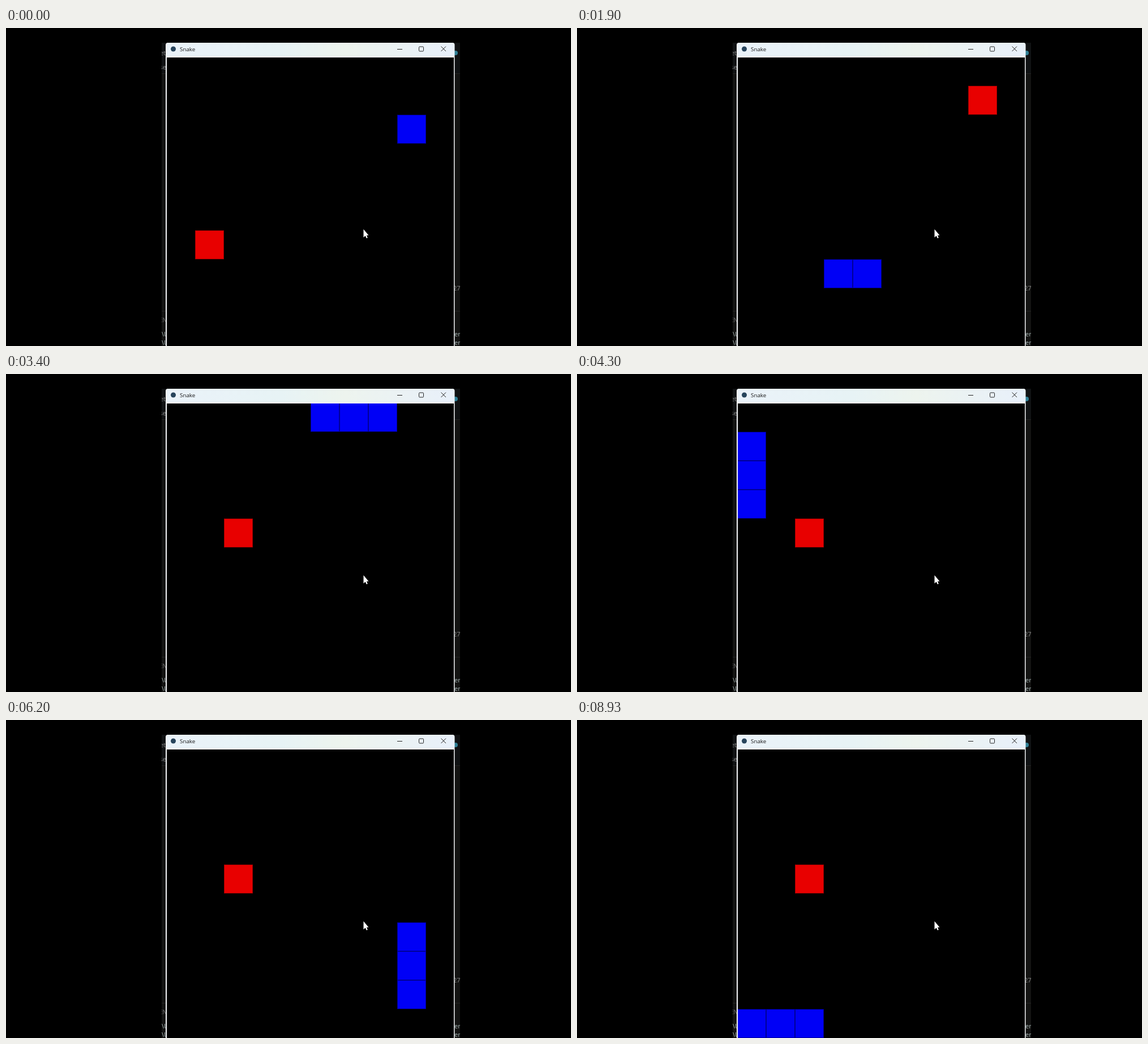
An HTML page for the animation above (8.96 s loop, 998 by 561 pixels).

```html
<!DOCTYPE html>
<html lang="en">
<head>
<meta charset="utf-8">
<title>Snake</title>
<style>
  html, body { margin: 0; width: 100%; height: 100%; overflow: hidden; background: #000; }
  svg { display: block; width: 100vw; height: 100vh; }
  text { font-family: "Open Sans", "Noto Sans", sans-serif; }
  .editor text { font-size: 11px; fill: #8b8b8b; }
  .editor .path { fill: #a9b8b8; }
  .editor .tab { fill: #777; font-size: 10px; }
  .buttons { fill: none; stroke: #222; stroke-width: 1; }
</style>
</head>
<body>
<svg viewBox="0 0 998 561">
  <defs>
    <linearGradient id="bar">
      <stop offset="0" stop-color="#eaf2f9"/>
      <stop offset=".4" stop-color="#e7f3f5"/>
      <stop offset=".62" stop-color="#edf4ee"/>
      <stop offset="1" stop-color="#e8f0fa"/>
    </linearGradient>
    <clipPath id="desk"><rect x="275" y="26" width="527" height="535"/></clipPath>
    <clipPath id="field"><rect x="284" y="52" width="507" height="509"/></clipPath>
  </defs>
  <rect width="998" height="561"/>

  <g class="editor" clip-path="url(#desk)">
    <rect x="275" y="26" width="527" height="535" fill="#141413"/>
    <rect x="275" y="26" width="527" height="54" fill="#101214"/>
    <path d="M275 80.500H802M275 499.500H802" stroke="#252525"/>
    <text x="282" y="48" text-anchor="end">Set</text>
    <text x="283" y="73" text-anchor="end">use</text>
    <text class="tab" x="284" y="519" text-anchor="end">EN</text>
    <text class="path" x="275" y="544">\U</text>
    <text class="path" x="275" y="559">\U</text>
    <circle cx="794" cy="44" r="4" fill="#2f7f96"/>
    <text x="790" y="463">27</text>
    <text class="path" x="792" y="544">er</text>
    <text class="path" x="792" y="559">er</text>
  </g>

  <path d="M282 561V30q0-4 4-4H788.500q4 0 4 4V561z" fill="#f4f6f8"/>
  <path d="M283 50V30q0-4 4-4H788q4 0 4 4V50z" fill="url(#bar)"/>
  <rect x="284" y="52" width="507" height="509"/>
  <circle cx="295.500" cy="37" r="4.500" fill="#27445c"/>
  <text x="307" y="41" font-size="9.800" fill="#1a1a1a">Snake</text>
  <g class="buttons">
    <path d="M691 37.500H700M768.500 32.500L777 41M777 32.500L768.500 41"/>
    <rect x="729.500" y="33" width="8" height="8" rx="1.300"/>
  </g>

  <g id="board" clip-path="url(#field)"></g>
  <path d="M631.500 355V369.500L634.700 366.600L636.800 371L638.800 370L636.900 365.800H640.500z" fill="#fff"/>
</svg>

<script>
const LOOP = 8960, DELAY = 180, TICK = 110.5, CELL = 51;
const START = [8, 2];
const ROUTE = "L7 D5 R7 U7 L8 D9 R8 U9 L8 D9 R2";
const FOODS = [[1, 6], [8, 1], [2, 4]];
const EATEN = [12, 26];   // steps on which the snake grows and new food appears
const DIRS = { L: [-1, 0], R: [1, 0], U: [0, -1], D: [0, 1] };

const path = [START];
for (const leg of ROUTE.split(" ")) {
  const [dx, dy] = DIRS[leg[0]];
  for (let i = +leg[1]; i > 0; i--) {
    const [x, y] = path[path.length - 1];
    path.push([x + dx, y + dy]);
  }
}

const board = document.getElementById("board");

function makeTile(fill, edge) {
  const tile = document.createElementNS("http://www.w3.org/2000/svg", "rect");
  const attrs = { x: .5, y: .5, width: 50, height: 50, fill, stroke: edge };
  for (const name in attrs) tile.setAttribute(name, attrs[name]);
  board.append(tile);
  return tile;
}

function place(tile, [col, row]) {
  tile.setAttribute("transform", `translate(${283 + col * CELL} ${51 + row * CELL})`);
}

const food = makeTile("#e80000", "#a00000");
const body = [0, 1, 2].map(() => makeTile("#0000f6", "#000096"));

let shown = -1;
function draw(time) {
  const step = Math.min(path.length - 1, Math.max(0, Math.floor((time - DELAY) / TICK)));
  if (step === shown) return;
  shown = step;
  const meals = EATEN.filter(s => step >= s).length;
  place(food, FOODS[meals]);
  body.forEach((tile, i) => {
    tile.style.display = i <= meals ? "" : "none";
    if (i <= meals) place(tile, path[step - i]);
  });
}

const begin = performance.now();
function frame() {
  draw((performance.now() - begin) % LOOP);
  requestAnimationFrame(frame);
}
frame();
</script>
</body>
</html>
```
